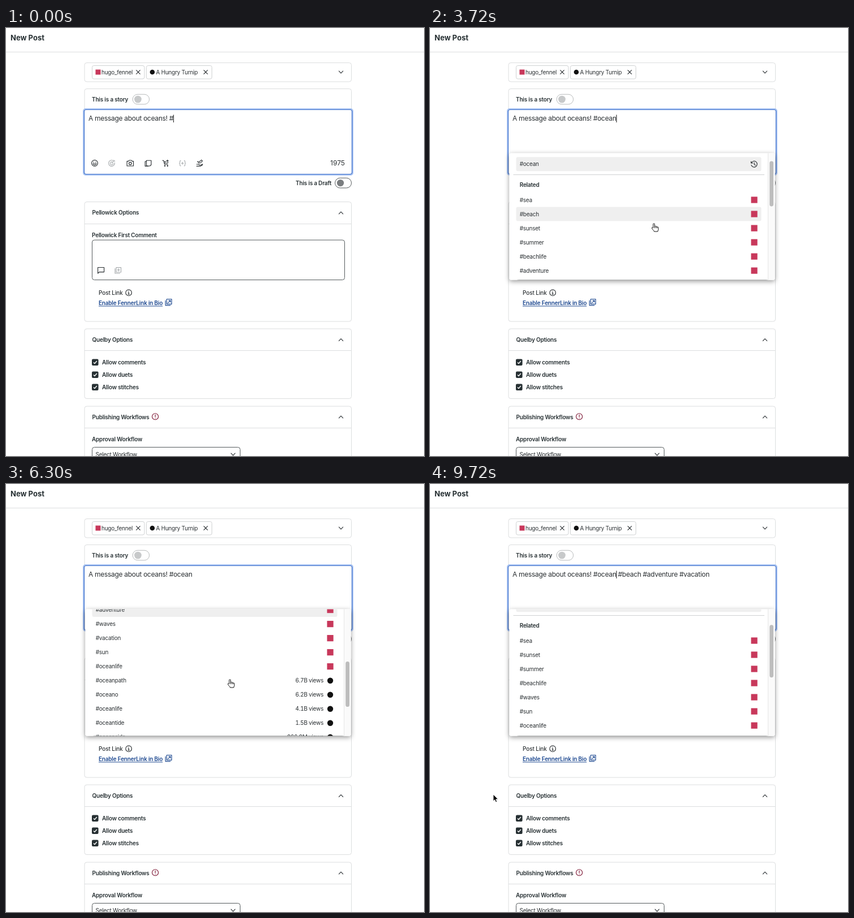
Recreate the animation shown at these times as an HTML page. Size 740 px wide and 757 px high, loop 9.78 s.

```html
<!DOCTYPE html>
<html lang="en">
<head>
<meta charset="utf-8">
<title>New Post</title>
<style>
  html, body { margin: 0; width: 100%; height: 100%; overflow: hidden; background: #fff; }
  svg { display: block; width: 740px; height: 757px; }
  text { font: 400 10px Inter, "Open Sans", sans-serif; letter-spacing: -.24px; fill: #2b3033; white-space: pre; }
  .b { font-weight: 600; letter-spacing: -.2px; fill: #273033; }
  .title { font-size: 13px; font-weight: 700; letter-spacing: 0; }
  .msg { font-size: 12px; letter-spacing: -.3px; }
  .count { font-size: 12px; letter-spacing: 0; }
  .end { text-anchor: end; }
  .views { font-variant-numeric: tabular-nums; }
  .card { fill: #fff; stroke: #dcdedf; }
  .chip { fill: #fff; stroke: #cfd2d3; }
  .field { fill: #fff; stroke: #555b5d; }
  .rule { stroke: #dcdedf; }
  .icon { fill: none; stroke: #2b3033; stroke-width: 1.15; stroke-linecap: round; stroke-linejoin: round; }
  .dim { stroke: #a9adaf; }
  .link { fill: #1f4a91; }
  .hot { fill: #efefef; }
</style>
</head>
<body>
<svg viewBox="0 0 740 757">
  <defs>
    <clipPath id="pane"><rect x="140.5" y="221.5" width="470" height="224" rx="3"/></clipPath>
    <filter id="shadow" x="-10%" y="-10%" width="120%" height="125%">
      <feDropShadow dx="0" dy="2.5" stdDeviation="4" flood-color="#000" flood-opacity=".42"/>
    </filter>
    <path id="down" d="M-3.6-1.8L0 1.8L3.6-1.8"/>
    <path id="up" d="M-3.6 1.8L0-1.8L3.6 1.8"/>
    <path id="cross" d="M-3.3-3.3L3.3 3.3M3.3-3.3L-3.3 3.3"/>
    <g id="tick">
      <rect x="-5.8" y="-5.8" width="11.6" height="11.6" rx="2" fill="#273033"/>
      <path d="M-2.8.2L-.8 2.3L3-2.2" fill="none" stroke="#fff" stroke-width="1.4"/>
    </g>
  </defs>

  <rect width="740" height="757" fill="#fff"/>
  <text class="b title" x="8" y="22.3">New Post</text>
  <path class="rule" d="M0 42.5H740"/>

  <!-- profile picker -->
  <rect class="card" x="139" y="61.5" width="472.5" height="33.5" rx="4"/>
  <rect class="chip" x="152.5" y="66.5" width="92.5" height="23.5" rx="3"/>
  <rect x="158.5" y="73.5" width="9" height="9" fill="#c8385b"/>
  <text x="169" y="81.8">hugo_fennel</text>
  <use href="#cross" class="icon" x="234" y="78"/>
  <rect class="chip" x="248.5" y="66.5" width="116" height="23.5" rx="3"/>
  <circle cx="259" cy="78" r="4.3" fill="#111"/>
  <text x="265.5" y="81.8">A Hungry Turnip</text>
  <use href="#cross" class="icon" x="353.5" y="78"/>
  <use href="#down" class="icon" x="593" y="78"/>

  <!-- composer -->
  <path class="card" d="M139 146V111.5Q139 107.5 143 107.5H607.5Q611.5 107.5 611.5 111.5V146"/>
  <text class="b" x="152" y="129.8">This is a story</text>
  <rect x="224.2" y="117.3" width="29.5" height="17.6" rx="8.8" fill="#fff" stroke="#b8bbbc"/>
  <circle cx="233.5" cy="126.1" r="6.4" fill="#c7c9ca"/>
  <rect x="137" y="143" width="477" height="117" rx="4" fill="none" stroke="#a9c4f3" stroke-width="2"/>
  <rect x="138.5" y="144.5" width="474" height="114" rx="3" fill="#fff" stroke="#3d6fc9" stroke-width="1.2"/>
  <text class="msg" id="msg" x="146" y="164.4"></text>
  <path id="caret" d="M0 153.5V167" stroke="#111"/>

  <g class="icon">
    <circle cx="157" cy="239" r="5.4"/>
    <path d="M154 240Q157 245 160 240ZM154.6 237.2h1M158.4 237.2h1"/>
    <g class="dim">
      <path d="M189.5 234.4A5.4 5.4 0 1 0 192.3 238.2M188 236.9A2.7 2.7 0 1 0 189.8 239.5M187.2 239.2L191 235.3V233.6M191 235.3H192.8"/>
    </g>
    <path d="M214.2 235.6H216.8L218 234H222L223.2 235.6H225.6V244H214.2Z"/><circle cx="219.9" cy="239.6" r="2.3"/>
    <path d="M248.6 234.2H257V242L254.8 244H250.4Q248.6 244 248.6 242ZM248.6 236H246.3V244.4H252"/>
    <path d="M277 234.2H279L280.8 241.2H286.4M279.6 236.6H283M280 239H286L287 237.6M285.8 233.2V236.6M284.1 234.9H287.5"/>
    <circle cx="281.2" cy="243.8" r=".7"/><circle cx="286" cy="243.8" r=".7"/>
    <path class="dim" d="M309.3 234.6Q307.7 234.6 307.9 236.6Q308.1 239 306.8 239.2Q308.1 239.4 307.9 241.8Q307.7 243.8 309.3 243.8M315.5 234.6Q317.1 234.6 316.9 236.6Q316.7 239 318 239.2Q316.7 239.4 316.9 241.8Q317.1 243.8 315.5 243.8M312.4 237.3V241.1M310.5 239.2H314.3"/>
    <path d="M337.5 241H340.5L343 242.5H345L348 240.8M337.5 244.4H344.5L348 242M341 239L342 236.8L346 233.4L347.8 235.2L344 238.8ZM339 236.5h1.4M339.7 235.8v1.4"/>
  </g>
  <text class="count end" id="count" x="600" y="243.3">1975</text>

  <text class="b end" x="576" y="277.6">This is a Draft</text>
  <rect x="582.5" y="265.3" width="29" height="17.6" rx="8.8" fill="#fff" stroke="#565b5d"/>
  <circle cx="592" cy="274.1" r="6.2" fill="#7b7e80"/>

  <!-- first options card -->
  <rect class="card" x="139" y="307.5" width="472.5" height="211.5" rx="4"/>
  <path class="rule" d="M139 346.5H611.5"/>
  <text class="b" x="152.5" y="330.3">Pellowick Options</text>
  <use href="#up" class="icon" x="593" y="327"/>
  <text class="b" x="152" y="370.3">Pellowick First Comment</text>
  <rect class="field" x="152.5" y="375" width="447" height="70.5" rx="4"/>
  <path class="icon" d="M162.6 423.5H173.6V431.6H165.2L162.6 434Z"/>
  <path class="icon dim" d="M195 423.6H203.6V432H195ZM193 425.5V434H201.6M199.3 425.8V429.8M197.3 427.8H201.3"/>
  <text x="164" y="471.9" style="font-weight:500;letter-spacing:-.1px">Post Link</text>
  <g class="icon"><circle cx="217.2" cy="468.2" r="5.3"/><path d="M216.4 467.5H217.3V470.8M216.2 470.8H218.4M217.1 465.3v.2"/></g>
  <text class="b link" x="164" y="490.4" text-decoration="underline">Enable FennerLink in Bio</text>
  <path class="icon" style="stroke:#1f4a91" d="M284.5 479.5H293.3V488.3H284.5ZM282.3 482V490.6H291M286.5 486.3L291 481.8M287.8 481.7H291.1V485"/>

  <!-- second options card -->
  <rect class="card" x="139" y="532" width="472.5" height="123.5" rx="4"/>
  <path class="rule" d="M139 570.5H611.5"/>
  <text class="b" x="152.5" y="555.3">Quelby Options</text>
  <use href="#up" class="icon" x="593" y="551.5"/>
  <use href="#tick" x="157.8" y="591.2"/><text class="b" x="170" y="594.8">Allow comments</text>
  <use href="#tick" x="157.8" y="613.2"/><text class="b" x="170" y="617">Allow duets</text>
  <use href="#tick" x="157.8" y="635.2"/><text class="b" x="170" y="639.2">Allow stitches</text>

  <!-- workflows card -->
  <rect class="card" x="139" y="669" width="472.5" height="110" rx="4"/>
  <path class="rule" d="M139 707.5H611.5"/>
  <text class="b" x="152.5" y="691.8">Publishing Workflows</text>
  <g class="icon" style="stroke:#7d1734"><circle cx="264.2" cy="687.2" r="5.5"/><path d="M264.2 684V687.8M264.2 690v.2"/></g>
  <use href="#up" class="icon" x="593" y="688"/>
  <text class="b" x="152" y="731.2">Approval Workflow</text>
  <rect class="field" x="152.5" y="741.5" width="262" height="30" rx="4"/>
  <text x="158.5" y="757.8">Select Workflow</text>
  <use href="#down" class="icon" x="402" y="754"/>

  <!-- suggestions -->
  <g id="menu">
    <rect x="140.5" y="221.5" width="470" height="224" rx="3" fill="#fff" filter="url(#shadow)"/>
    <g clip-path="url(#pane)">
      <g id="list">
        <text class="b" x="158.7" y="248.2">Recently Used</text>
        <rect class="hot" x="152.5" y="258.3" width="434" height="25" rx="3"/>
        <text x="158.7" y="274.4">#ocean</text>
        <path class="icon" d="M569.2 268.2A5.3 5.3 0 1 1 568.8 272.4M568.4 266V268.9H571.3M574 268V271.3L576.2 272.8"/>
        <path d="M147.5 289.5H592" stroke="#cfd1d2"/>
        <text class="b" x="158.7" y="311.1">Related</text>
        <rect class="hot" id="hover" x="152.5" width="434" height="25" rx="3"/>
      </g>
      <rect x="598.5" y="221" width="13" height="225" fill="#fafafa"/>
      <path d="M598.5 221V446" stroke="#e6e6e6"/>
      <rect id="thumb" x="601.2" width="6.8" rx="3.4" fill="#bdbdbd"/>
    </g>
  </g>

  <path id="hand" fill="#fff" stroke="#111" stroke-width="1" stroke-linejoin="round"
    d="M-1.4.8C-1.4-.6 1.2-.6 1.2.8V5C2 4 3.4 4.2 3.6 5.3C4.6 4.6 5.6 5 5.8 6C6.8 5.5 7.8 6 7.8 7.2V9.5C7.8 12 6.8 12.5 6.6 14H.4C0 12.5-2 11-3.6 8.4C-4.6 7-3 6-1.4 7.6ZM1.2 5V8M3.6 5.5V8M5.8 6.2V8.2"/>
  <path id="arrow" fill="#000" stroke="#fff" stroke-width=".9" d="M0 0V12L2.7 9.5L4.5 13.7L6.6 12.8L4.8 8.7H8.5Z"/>
</svg>
<script>
const LOOP = 9780, STEP = 60, FIRST = 334, GAP = 25.02;
const $ = id => document.getElementById(id);
const set = (el, props) => { for (const k in props) el.setAttribute(k, props[k]); };
const show = (el, on) => set(el, { visibility: on ? 'visible' : 'hidden' });

const photoTags = 'sea beach sunset summer beachlife adventure waves vacation sun oceanlife'.split(' ');
const videoTags = ['oceanpath 6.7B', 'oceano 6.2B', 'oceanlife 4.1B', 'oceantide 1.5B', 'oceanside 866.9M',
  'oceans 1.8B', 'oceanly 824.6M', 'oceanripple 679.8M', 'oceancity 560.7M'];

// [time, value...]
const pointer = [[960, 300, 420], [1560, 350, 331], [2640, 350, 331], [2940, 356, 333], [3660, 396.5, 346],
  [6840, 396.5, 346], [7500, 292.5, 304], [7860, 292.5, 304], [8400, 290, 373], [8700, 290, 373],
  [9000, 286, 398], [9540, 250, 400], [9600, 178, 470], [9660, 130, 530], [9720, 112, 549]];
const scroll = [[3600, 0], [3720, 30], [4020, 112], [4140, 112], [4380, 175], [4680, 255], [4920, 333],
  [5100, 333], [5160, 337.5], [5460, 362], [6000, 362], [6300, 236.5], [6600, 120], [6840, 120],
  [7200, 72], [7500, 57]];
const typing = [[180, 1], [240, 2], [300, 3], [420, 5]];
const picks = [[7860, 'beach'], [8640, 'adventure'], [9180, 'vacation']];
const blinks = [1020, 1500, 2040, 2460, 3000, 3480, 3960, 4440, 4920, 5340, 5700, 6360, 6600, 7080, 7500,
  8100, 8400, 8940, 9420, 9540];

const linear = u => u, smooth = u => u * u * (3 - 2 * u);

function track(keys, t, ease) {
  const n = keys.findIndex(k => k[0] > t);
  if (n === 0) return keys[0].slice(1);
  if (n < 0) return keys[keys.length - 1].slice(1);
  const a = keys[n - 1], b = keys[n], u = ease((t - a[0]) / (b[0] - a[0]));
  return a.slice(1).map((v, i) => v + (b[i + 1] - v) * u);
}

function addRow(markup) {
  const g = document.createElementNS('http://www.w3.org/2000/svg', 'g');
  g.innerHTML = markup;
  $('list').append(g);
  return g;
}

const rows = [
  ...photoTags.map(name => ({ name, el: addRow(
    `<text x="158.7" y="3.6">#${name}</text><rect x="568.4" y="-5.6" width="11.2" height="11.2" fill="#c8385b"/>`) })),
  ...videoTags.map(tag => {
    const [name, views] = tag.split(' ');
    return { name, el: addRow(`<text x="158.7" y="3.6">#${name}</text>
      <text class="end views" x="562" y="3.6">${views} views</text><circle cx="574" r="5.2" fill="#111"/>`) };
  })
];

function hoveredRow(t, y, top) {
  if (t < 960 || t >= 9600) return -1;
  if (t >= 3660 && t < 4080) return 1;
  if (t >= 4080 && t < 7200) return 5;   // hover stays put while the list scrolls
  return Math.round((y + top - FIRST) / GAP);
}

function draw(time) {
  const t = Math.floor(time / STEP) * STEP;
  const typed = typing.filter(k => k[0] <= t).reduce((n, k) => k[1], 0);
  const picked = picks.filter(p => p[0] <= t).map(p => p[1]);
  const head = 'A message about oceans! #' + 'ocean'.slice(0, typed);
  const msg = $('msg');
  msg.textContent = [head, ...picked.map(p => '#' + p)].join(' ');
  $('count').textContent = 1975 - typed;
  set($('caret'), { transform: `translate(${146.4 + msg.getSubStringLength(0, head.length)} 0)` });
  show($('caret'), blinks.filter(b => b <= t).length % 2 === 0);

  const [top] = track(scroll, t, linear);
  const [x, y] = track(pointer, t, t < 9540 ? smooth : linear);
  const left = rows.filter(r => !picked.includes(r.name));
  for (const r of rows) {
    const i = left.indexOf(r);
    set(r.el, { display: i < 0 ? 'none' : 'inline', transform: `translate(0 ${FIRST + i * GAP})` });
  }
  const hot = hoveredRow(t, y, top);
  set($('hover'), { y: FIRST - 12.5 + hot * GAP, display: hot < 0 ? 'none' : 'inline' });
  set($('list'), { transform: `translate(0 ${-top})` });

  const size = 537 - 25 * picked.length;
  set($('thumb'), { y: 224 + top * 204.6 / size, height: 42960 / size });
  set($('menu'), { display: t < 720 ? 'none' : 'inline' });

  const away = t >= 9600;
  show($('hand'), t >= 960 && !away);
  show($('arrow'), away);
  set($(away ? 'arrow' : 'hand'), { transform: `translate(${x} ${y})` });
}

const start = performance.now();
function tick() {
  draw((performance.now() - start) % LOOP);
  requestAnimationFrame(tick);
}
tick();
</script>
</body>
</html>
```
